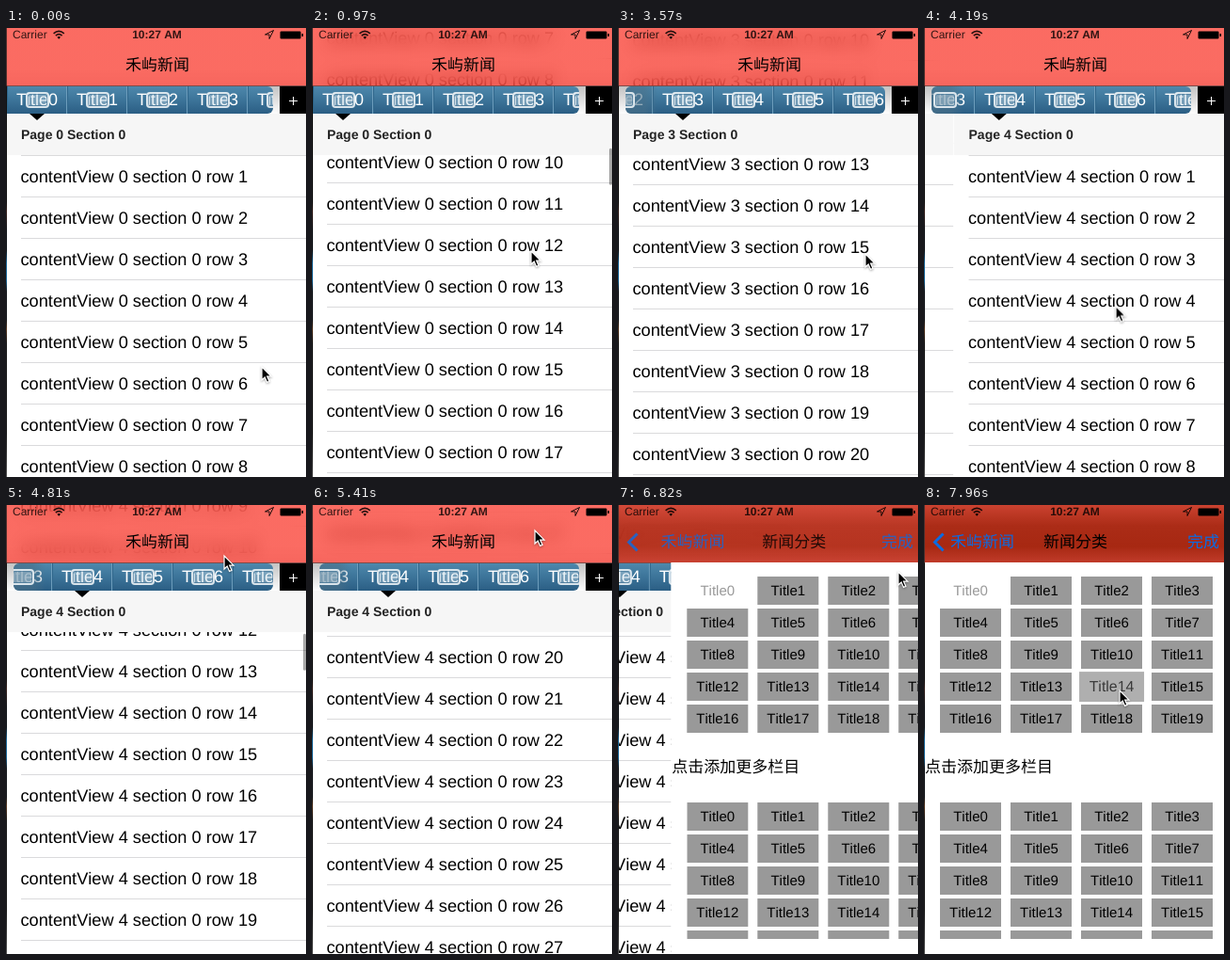
These frames come from a looping animation (319 by 477 pixels, 7990 ms). An HTML page:

```html
<!DOCTYPE html>
<html lang="zh">
<head>
<meta charset="utf-8">
<title>禾屿新闻</title>
<style>
@property --p { syntax: "<number>"; inherits: true; initial-value: 0; }
@property --s0 { syntax: "<number>"; inherits: true; initial-value: 0; }
@property --s4 { syntax: "<number>"; inherits: true; initial-value: 0; }
@property --k { syntax: "<number>"; inherits: true; initial-value: 0; }
@property --bar { syntax: "<number>"; inherits: true; initial-value: 0; }

html, body { margin: 0; width: 100%; height: 100%; overflow: hidden; background: #fff; }
body { font-family: "Liberation Sans", "Noto Sans CJK SC", "Noto Sans CJK", sans-serif; color: #000;
  font-kerning: none; text-rendering: geometricPrecision; }
#stage, #stage div, #stage svg { position: absolute; }
#stage {
  left: 0; top: 0; width: 319px; height: 477px; overflow: hidden; background: #fff;
  animation: 7990ms linear infinite;
  animation-name: page, listA, listB, push, bar;
}
#stage div { white-space: nowrap; box-sizing: border-box; }

/* lists */
#home { left: 0; top: 0; width: 320px; height: 477px; transform: translateX(calc(var(--k) * -96px)); }
.page { left: 0; top: 0; width: 320px; height: 477px; overflow: hidden; background: #fff;
  transform: translateX(calc((var(--n) - var(--p)) * 320px)); }
.rows { left: 16px; top: 92px; width: 304px; transform: translateY(calc(var(--s) * -1px)); }
.row { left: 0; width: 304px; height: 44px; line-height: 44px; font-size: 18.2px;
  text-indent: -.5px; border-bottom: 1px solid #dadadc; }
.head { left: 0; top: 91px; width: 320px; height: 44px; padding-left: 16px; background: #f6f6f6;
  font-weight: bold; font-size: 14px; line-height: 45px; color: #232323; }
.thumb { left: 316px; top: 90px; width: 3px; height: 39px; border-radius: 2px; background: #0005;
  opacity: var(--bar); transform: translateY(calc(var(--s) * .092px)); }

/* tab strip */
#strip { left: 0; top: 61px; width: 320px; height: 30px; background: linear-gradient(#c2c2c2, #fdfdfd);
  border-top: 1px solid #7d4a48; }
#clip { left: calc(min(8, var(--p) * 52) * 1px); top: 0; right: 36px; height: 29px; overflow: hidden;
  border-radius: calc(min(6, var(--p) * 52) * 1px) 6px 6px calc(min(6, var(--p) * 52) * 1px); }
#track { left: calc((1 - min(8, var(--p) * 52) - var(--p) * 52) * 1px); top: 0; }
.tab { top: 0; width: 64px; height: 29px; line-height: 28px; text-align: center; font-size: 18px; color: #fff;
  background: linear-gradient(#4e88ac, #3c7499 50%, #2b5e84);
  box-shadow: inset -1px 0 #6d9dbc, inset 1px 0 #2f668b; }
.tab::before { content: ""; position: absolute; z-index: 2; left: 20px; top: 6px; width: 25px; height: 17px;
  box-sizing: border-box; border: 2px solid #eaf1f5dd; border-radius: 4px; background: #cfe0ea66;
  box-shadow: inset 0 0 0 1px #2f668b88; }
#fade { z-index: 1; left: 0; top: 0; width: 34px; height: 29px; opacity: min(1, var(--p) * 2);
  background: linear-gradient(90deg, #4a7088b0, #4a708890 60%, #4a708800); }
#arrow { left: 25px; top: 91px; border: 8px solid transparent; border-top: 7px solid #000; border-bottom: 0;
  transform: translateX(calc(var(--p) * 12px)); }
#plus { left: 291px; top: 0; width: 29px; height: 29px; background: #000; }
#plus::before, #plus::after { content: ""; position: absolute; left: 10px; top: 15px; width: 9px; height: 1px; background: #fff; }
#plus::after { transform: rotate(90deg); }

/* category screen */
#cats { left: 0; top: 61px; width: 320px; height: 416px; overflow: hidden; background: #fff;
  transform: translateX(calc((1 - var(--k)) * 321px)); }
#more { left: 1px; top: 205px; font-size: 17px; line-height: 26px; }
.grid { left: 17px; width: 300px; height: 166px; }
#rest { overflow: hidden; height: 145px; }
.tile { width: 65px; height: 30px; line-height: 31px; background: #999; text-align: center; font-size: 15px; }
.fixed { background: #fff; color: #999; }
.held { animation: hold 7990ms linear infinite; z-index: 1; }

/* navigation bar */
#nav { left: 0; top: 0; width: 320px; height: 61px; overflow: hidden;
  background: linear-gradient(rgba(249, 47, 34, .71) 70%, rgba(243, 45, 34, .73));
  backdrop-filter: blur(9px); }
#dark { left: 0; top: 0; width: 320px; height: 61px; opacity: var(--k);
  background: linear-gradient(#cb4230, #ab2c17 22px, #a72812 44px, #c03b2a); }
.label { top: 27px; font-size: 17px; line-height: 25px; }
.title { left: 1px; width: 320px; text-align: center; font-weight: 500; }
.blue { color: #0b6be2; opacity: var(--k); }
#old { opacity: calc(1 - var(--k) * 1.6); transform: translateX(calc(var(--k) * -100px)); }
#new { opacity: var(--k); transform: translateX(calc((1 - var(--k)) * 150px)); }
#back { left: 28px; transform: translateX(calc((1 - var(--k)) * 100px)); }
#done { left: 280px; }
#chev { left: 9px; top: 29px; opacity: var(--k); }
.stat { top: 0; line-height: 15px; font-size: 12px; color: #000c; }
#edge { left: 0; top: 0; width: 1px; height: 477px;
  background: linear-gradient(#54312e 61px, #111 62px 185px, #3a2420 195px, #101418 215px 236px, #1c6a9c 250px 268px, #15181c 280px 310px, #5b3a22 320px, #181818 335px 430px, #555); }
#cursor { left: 0; top: 0; overflow: visible; filter: drop-shadow(0 1px 1px #0005);
  animation: point 7990ms linear infinite; }

@keyframes page {
  0%, 18.15% { --p: 0; animation-timing-function: ease-in; }
  25.53% { --p: .625; animation-timing-function: step-end; }
  44.68%, 45.8% { --p: 3; animation-timing-function: ease-in-out; }
  54.32%, 100% { --p: 4; }
}
@keyframes listA {
  0%, 1.5% { --s0: 0; animation-timing-function: ease-in; }
  6.26% { --s0: 100; }
  8.76% { --s0: 235; }
  12.14%, 12.8% { --s0: 411; animation-timing-function: ease-out; }
  16.27%, 100% { --s0: 541; }
}
@keyframes listB {
  0%, 55.07% { --s4: 0; }
  57% { --s4: 160; }
  60.2%, 61.2% { --s4: 509; animation-timing-function: ease-out; }
  65.46%, 100% { --s4: 832; }
}
@keyframes push {
  0%, 81.35% { --k: 0; animation-timing-function: cubic-bezier(.25, .5, .3, 1); }
  90.24%, 100% { --k: 1; }
}
@keyframes bar {
  0%, 1.5% { --bar: 0; }
  2.5%, 15.5% { --bar: 1; }
  18%, 55.07% { --bar: 0; }
  56%, 64% { --bar: 1; }
  65.4%, 100% { --bar: 0; }
}
@keyframes hold {
  0%, 98.7% { transform: none; opacity: 1; }
  99.6%, 100% { transform: scale(1.06); opacity: .78; }
}
@keyframes point {
  0%, 1.5% { transform: translate(271px, 359px); }
  6.26% { transform: translate(246px, 275px); }
  8.76% { transform: translate(236px, 240px); }
  12.14%, 18.15% { transform: translate(232px, 236px); }
  21.9% { transform: translate(290px, 237px); }
  25.53% { transform: translate(254px, 239px); animation-timing-function: step-end; }
  44.68%, 45.8% { transform: translate(262px, 239px); }
  48.8% { transform: translate(160px, 245px); }
  54.32%, 55.07% { transform: translate(225px, 320px); }
  60.2%, 61.2% { transform: translate(231px, 53px); }
  63%, 67.71% { transform: translate(236px, 26px); animation-timing-function: ease-in-out; }
  72% { transform: translate(290px, 182px); animation-timing-function: ease-in-out; }
  77.35%, 90.6% { transform: translate(297px, 70px); }
  91.5% { transform: translate(230px, 33px); }
  93.3% { transform: translate(38px, 150px); }
  94.9% { transform: translate(110px, 256px); }
  97%, 100% { transform: translate(207px, 196px); }
}
</style>
</head>
<body>
<div id="stage">
  <div id="home">
    <div id="strip">
      <div id="clip"><div id="track"></div><div id="fade"></div></div>
      <div id="plus"></div>
    </div>
    <div id="arrow"></div>
  </div>
  <div id="cats">
    <div class="grid" id="mine" style="top:15px"></div>
    <div id="more">点击添加更多栏目</div>
    <div class="grid" id="rest" style="top:255px"></div>
  </div>
  <div id="nav">
    <div id="dark"></div>
    <div class="label title" id="old">禾屿新闻</div>
    <div class="label title" id="new">新闻分类</div>
    <svg id="chev" width="14" height="22" fill="none" stroke="#0b6be2" stroke-width="3"><path d="M11.5 1.5 2.5 10.5l9 9"/></svg>
    <div class="label blue" id="back">禾屿新闻</div>
    <div class="label blue" id="done">完成</div>
    <div class="stat" style="left:7px">Carrier</div>
    <div class="stat" style="left:1px;width:319px;text-align:center;font-weight:bold">10:27 AM</div>
    <svg width="320" height="15" style="left:0;top:0" fill="none" stroke="#000" stroke-opacity=".85">
      <path d="M50.6 5.8q5.6-5 11.2 0M52.8 8.2q3.4-3 6.8 0" stroke-width="1.6"/>
      <path d="M54.4 9.8q1.8-1.4 3.6 0l-1.8 2z" fill="#000" stroke="none"/>
      <path d="M284.5 2.5 275.5 7h4.5v4.5z"/>
      <rect x="291.5" y="3.5" width="22" height="8" rx="1.5" stroke-opacity=".5"/>
      <path d="M292 4h21v7h-21zM314.5 6h1.5v3h-1.5z" fill="#000" stroke="none"/>
    </svg>
  </div>
  <div id="edge"></div>
  <svg id="cursor" width="14" height="20">
    <path d="M1 1v14l3.2-3 2.4 5.4 2.4-1L6.7 11.2H11z" fill="#000" stroke="#fff" stroke-width="1.2"/>
  </svg>
</div>
<script>
const get = id => document.getElementById(id);
const fill = (n, make) => Array.from({ length: n }, (_, i) => make(i)).join("");

const rows = page => fill(32, i =>
  `<div class="row" style="top:${i * 44}px">contentView ${page} section 0 row ${i}</div>`);

const table = (page, scroll) =>
  `<div class="page" style="--n:${page};--s:${scroll}">
    <div class="rows">${rows(page)}</div>
    <div class="head">Page ${page} Section 0</div>
    <div class="thumb"></div>
  </div>`;

const tiles = (n, kind) => fill(n, i =>
  `<div class="tile ${kind(i)}" style="left:${i % 4 * 75}px;top:${Math.floor(i / 4) * 34}px">Title${i}</div>`);

get("home").insertAdjacentHTML("afterbegin",
  table(0, "var(--s0)") + table(1, 0) + table(3, 541) + table(4, "var(--s4)"));
get("track").innerHTML = fill(12, i =>
  `<div class="tab" style="left:${i * 64}px">Title${i}</div>`);
get("mine").innerHTML = tiles(20, i => i === 0 ? "fixed" : i === 14 ? "held" : "");
get("rest").innerHTML = tiles(20, () => "");
</script>
</body>
</html>
```
